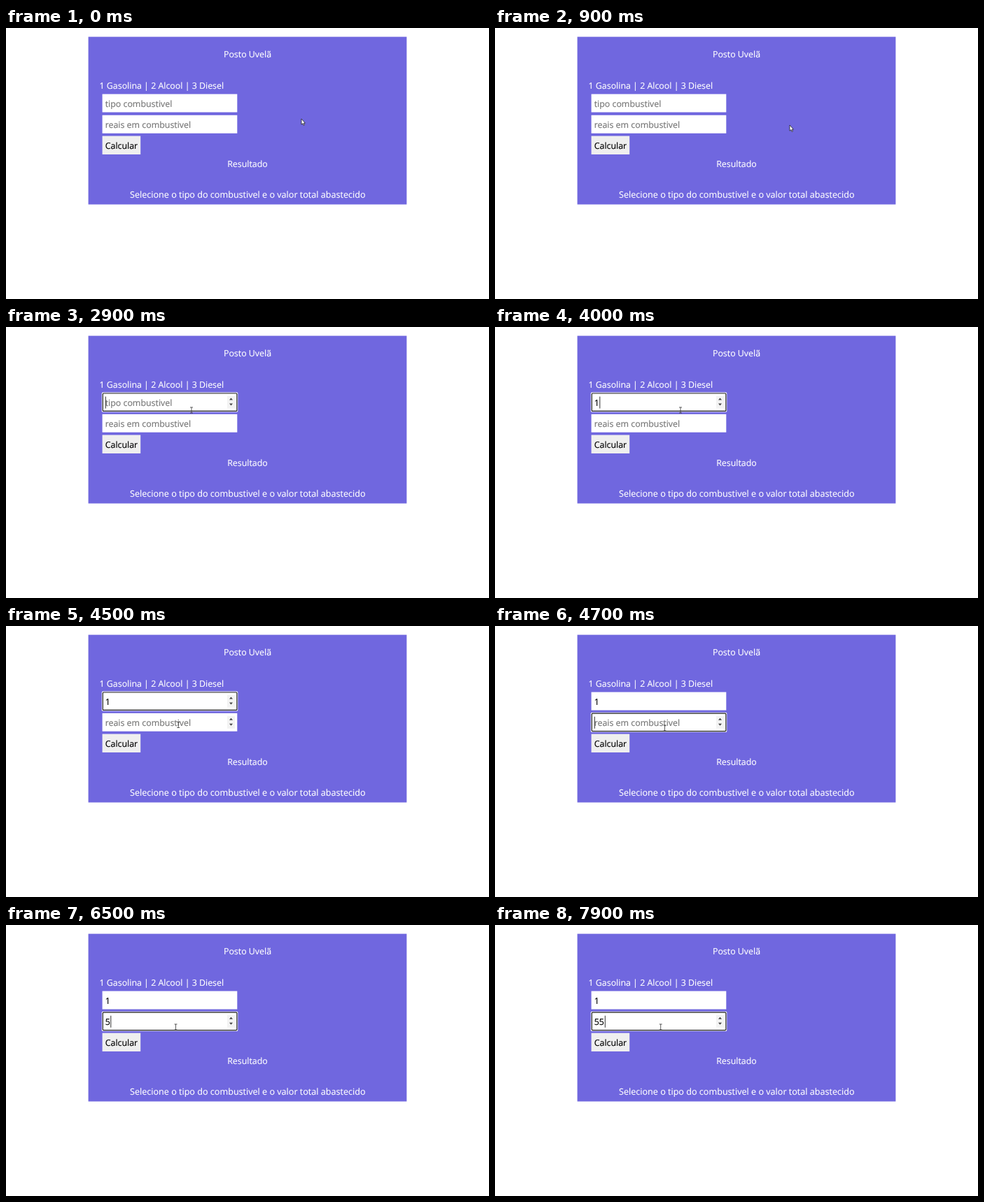
An HTML page for the animation above (8000 ms loop, 690 by 388 pixels).

```html
<!DOCTYPE html>
<html lang="pt">
<head>
<meta charset="utf-8">
<style>
  html, body { margin: 0; width: 100%; height: 100%; overflow: hidden; background: #fff; }
  svg { display: block; width: 690px; height: 388px; }
  text { font: 12.4px "Open Sans", sans-serif; fill: #fff; stroke: #fff; stroke-width: .15; text-rendering: geometricPrecision; }
  .mid { text-anchor: middle; }
  .dark { fill: #000; stroke: #000; }
  .hint { fill: #757575; stroke: #757575; }
</style>
</head>
<body>
<svg viewBox="0 0 690 388">
  <rect x="117.6" y="12.6" width="454.8" height="240" fill="#7067df"/>
  <text class="mid" x="345" y="42">Posto Uvelã</text>
  <text x="133.5" y="87">1 Gasolina | 2 Alcool | 3 Diesel</text>
  <g id="fields"></g>
  <rect x="137.6" y="154.6" width="54.6" height="26.4" fill="#efefef"/>
  <text class="dark" x="141.7" y="173.3">Calcular</text>
  <text class="mid" x="345" y="199">Resultado</text>
  <text class="mid" x="345.3" y="243" style="font-size:12.6px">Selecione o tipo do combustivel e o valor total abastecido</text>
  <g id="pointer">
    <path id="arrow" d="M0 0V8.2L1.9 6.6L3.2 9.5L4.4 8.9L3.2 6.2H5.4Z" fill="#fff" stroke="#222" stroke-width=".8"/>
    <path id="beam" d="M-2 -4H2M0 -4V4M-2 4H2" fill="none" stroke="#333" stroke-width=".8"/>
  </g>
</svg>
<script>
const LOOP = 8000, STEP = 100;
const $ = id => document.getElementById(id);

// Pointer path: time, x, y
const path = [
  [500, 422, 130], [900, 421, 139], [1900, 421, 139], [2200, 320.5, 115],
  [2500, 266, 118], [2700, 265, 119], [4000, 265, 119], [4600, 242.5, 146],
  [7700, 242.5, 146], [7900, 236.7, 146]
];

// typed: [time, value]; caret: spans in which it shows
const fields = [
  { y: 94.6, hint: "tipo combustivel", focus: [2900, 4700],
    typed: [[3200, "1"]], caret: [[2900, 3600], [4000, 4500]] },
  { y: 124.8, hint: "reais em combustivel", focus: [4700, LOOP],
    typed: [[6400, "5"], [6900, "55"]], caret: [[4700, 5200], [5700, 6300], [6400, 7400], [7900, LOOP]] }
];

const within = (t, [from, to]) => t >= from && t < to;

function pointerAt(t) {
  const next = path.findIndex(p => p[0] > t);
  if (next === 0) return path[0].slice(1);
  if (next < 0) return path[path.length - 1].slice(1);
  const [t0, x0, y0] = path[next - 1], [t1, x1, y1] = path[next];
  const k = (t - t0) / (t1 - t0);
  return [x0 + (x1 - x0) * k, y0 + (y1 - y0) * k];
}

const isOver = (f, [x, y]) => x >= 138 && x <= 330 && y >= f.y && y <= f.y + 26;

function spinner(y, pressed) {
  return `<rect x="316" y="${y + 4}" width="11" height="18" fill="#f3f3f3"/>
    ${pressed ? `<rect x="316" y="${y + 13}" width="11" height="9" fill="#cecece"/>` : ""}
    <path d="M319 ${y + 10}l2.5 -3l2.5 3zM319 ${y + 15}l2.5 3l2.5 -3z" fill="#444"/>`;
}

function drawField(f, t, mouse) {
  const { y } = f;
  const focused = within(t, f.focus), hovered = isOver(f, mouse);
  const entry = f.typed.filter(([at]) => t >= at).pop();
  const value = entry ? entry[1] : "";
  let out = focused
    ? `<rect x="136.8" y="${y - 1.1}" width="194.5" height="28.2" rx="1.5" fill="#fff"/>
       <rect x="138.3" y="${y + .4}" width="191.6" height="25.4" rx="1" fill="#fff" stroke="#1c1c1c" stroke-width="1.2"/>`
    : `<rect x="137.6" y="${y}" width="192.7" height="26" fill="#fff"/>`;
  out += `<text class="${value ? "dark" : "hint"}" x="141.7" y="${y + 18.1}">${value || f.hint}</text>`;
  if (focused || hovered) out += spinner(y, hovered && mouse[0] > 316);
  if (f.caret.some(span => within(t, span)))
    out += `<rect x="${141.8 + 7.5 * value.length}" y="${y + 5}" width="1" height="17" fill="#333"/>`;
  return out;
}

function draw(t) {
  const mouse = pointerAt(t);
  const over = fields.some(f => isOver(f, mouse));
  $("fields").innerHTML = fields.map(f => drawField(f, t, mouse)).join("");
  $("pointer").setAttribute("transform", `translate(${mouse})`);
  $("arrow").setAttribute("visibility", over ? "hidden" : "visible");
  $("beam").setAttribute("visibility", over ? "visible" : "hidden");
}

const start = performance.now();
function tick() {
  const t = (performance.now() - start) % LOOP;
  draw(Math.floor(t / STEP) * STEP);
  requestAnimationFrame(tick);
}
tick();
</script>
</body>
</html>
```
